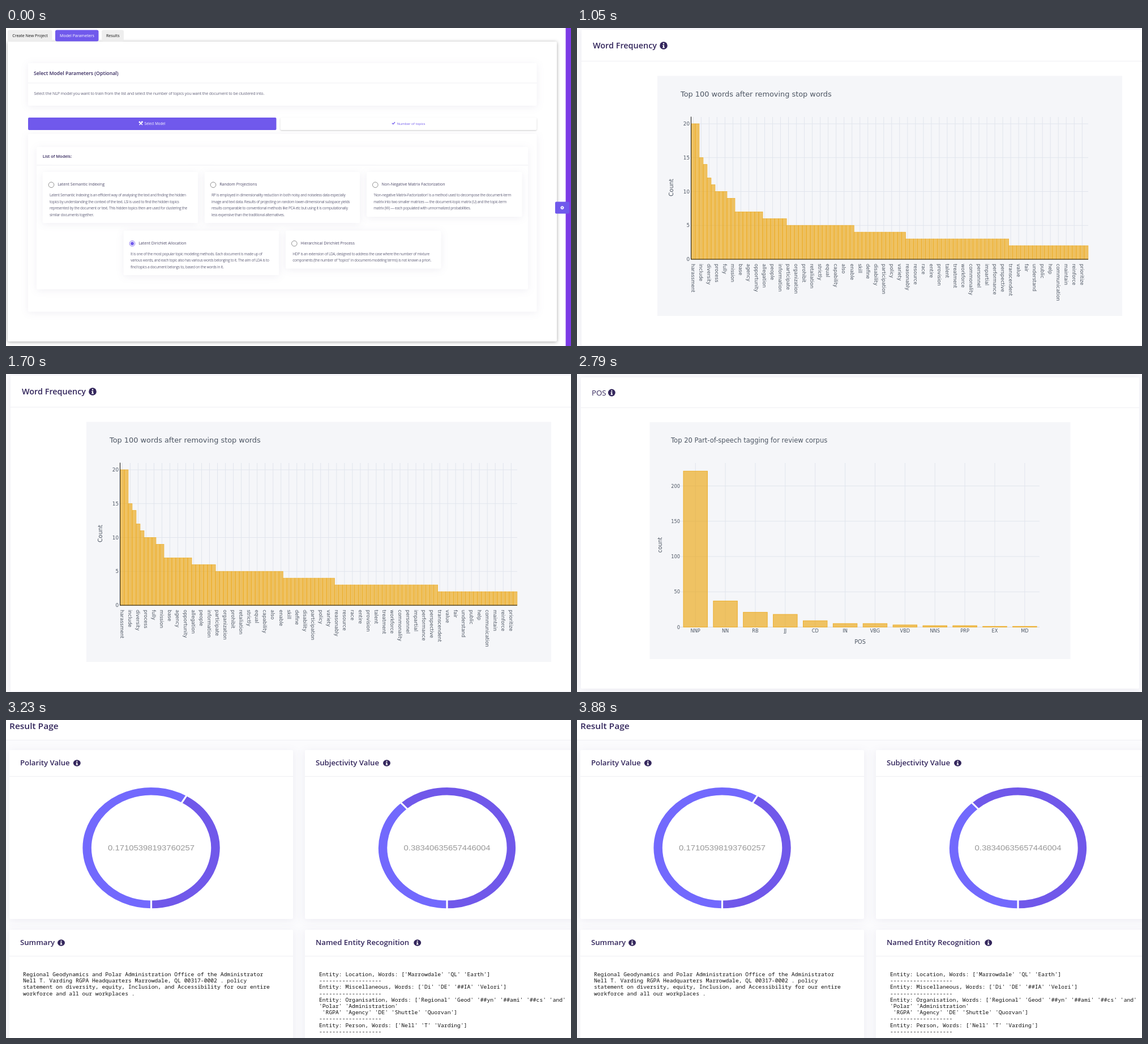
Animation of 998 by 561 pixels, one loop 4320 ms. Source, as an HTML page:

```html
<!DOCTYPE html>
<html lang="en">
<head>
<meta charset="utf-8">
<title>Topic modelling dashboard</title>
<style>
html, body { margin: 0; height: 100%; overflow: hidden; background: #fff; }
svg { display: block; width: 100vw; height: 100vh; }
text { white-space: pre; font-family: "Open Sans", sans-serif; fill: #33265c; }
.b { font-weight: 600; }
.plot { font-family: "DejaVu Sans", sans-serif; fill: #4d5663; }
.mono { font-family: "Noto Sans Mono", monospace; fill: #111; }
.num { font-family: "Liberation Sans", Arial, sans-serif; fill: #999; }
.soft { fill: #65647c; letter-spacing: -.023em; }
.tight { letter-spacing: -.048em; }
.card { fill: #fff; filter: drop-shadow(0 2px 7px rgba(60, 50, 120, .08)); }
.panel { fill: #fff; filter: drop-shadow(0 1px 3px rgba(0, 0, 0, .35)); }
.bar { fill: rgba(236, 161, 0, .6); stroke: #ecae2c; }
</style>
</head>
<body>
<svg id="stage" viewBox="0 0 998 561" preserveAspectRatio="none"></svg>
<script>
const PURPLE = '#7059ec', INK = '#33265c', GRID = '#e1e5ed', LINE = '#efeff3';

const rect = (x, y, r, b, fill, extra = '') =>
  `<rect x="${x}" y="${y}" width="${r - x}" height="${b - y}" fill="${fill}" ${extra}/>`;
const card = (x, y, r, b, cls = 'card') => rect(x, y, r, b, '#fff', `class="${cls}" rx="2"`);
const line = (x1, y1, x2, y2, color = LINE, w = 1) =>
  `<path d="M${x1} ${y1}L${x2} ${y2}" stroke="${color}" stroke-width="${w}"/>`;
const text = (x, y, size, str, cls = '', extra = '') =>
  `<text x="${x}" y="${y}" font-size="${size}" class="${cls}" ${extra}>${str}</text>`;
const lines = (x, y, step, size, rows, cls) =>
  rows.map((row, i) => text(x, y + i * step, size, row, cls)).join('');
const MID = 'text-anchor="middle"', END = 'text-anchor="end"';
const white = 'style="fill:#fff"', violet = `style="fill:${PURPLE}"`;

const info = (x, y, r) => `<g transform="translate(${x} ${y}) scale(${r / 6.5})">
  <circle r="6.5" fill="${INK}"/><circle cy="-3.1" r="1.2" fill="#fff"/>
  <path d="M-1.7-.9H1V2.7H1.8V4H-1.8V2.7H-1V.4H-1.7Z" fill="#fff"/></g>`;

// Model selection
function model(x, y, b, name, rows, on) {
  const w = x + 274.5, cy = y + 22.7;
  return card(x, y, w, b) +
    `<circle cx="${x + 15.3}" cy="${cy}" r="4.8" fill="#fff" stroke="${on ? PURPLE : '#777'}" stroke-width=".8"/>` +
    (on ? `<circle cx="${x + 15.3}" cy="${cy}" r="3" fill="${PURPLE}"/>` : '') +
    text(x + 26.5, y + 24.2, 7.05, name, '', 'style="fill:#4a4666"') +
    lines(x + 12.3, y + 43, 11.6, 6.6, rows, 'soft tight');
}

function parameters() {
  return rect(0, 0, 998, 561, '#fff') +
    card(3, 24, 973, 553, 'panel') +
    rect(3, 3.5, 81.5, 23.5, '#eee', 'rx="3"') + rect(169, 3.5, 208, 23.5, '#eee', 'rx="3"') +
    rect(87, 3.5, 163.5, 23.5, PURPLE, 'rx="3"') +
    text(42.5, 16, 7.05, 'Create New Project', '', MID + ' style="fill:#111"') +
    text(125.5, 16, 7.1, 'Model Parameters', '', MID + ' ' + white) +
    text(188.7, 16, 7.05, 'Results', '', MID + ' style="fill:#111"') +
    rect(988.6, 0, 998, 561, '#7c3be6') +
    rect(970, 306.5, 995, 327.5, PURPLE, 'rx="2"') +
    `<g transform="translate(982.5 317)" fill="none" stroke="#fff">
      <circle r="1.8" stroke-width="1.6"/><circle r="2.8" stroke-width="1" stroke-dasharray="1.1"/></g>` +
    card(39, 62, 937.5, 137) + line(39, 97, 937.5, 97) +
    text(49, 83, 8.75, 'Select Model Parameters (Optional)', 'b') +
    text(49.5, 117.7, 7.15, 'Select the NLP model you want to train from the list and select the number of topics you want the document to be clustered into.', 'soft') +
    rect(39, 158, 477.5, 180, PURPLE, 'rx="2"') +
    `<path d="M236 166L241 171M241 165.5L235.5 171" stroke="#fff" stroke-width="1.5"/>
     <circle cx="236" cy="166" r="1.5" fill="#fff"/><circle cx="240.3" cy="165.8" r="1.5" fill="#fff"/>` +
    text(244.5, 170.5, 6.2, 'Select Model', '', white) +
    rect(484.5, 158, 937.5, 180, '#fff', 'rx="2" style="filter:drop-shadow(0 1px 1px rgba(0,0,0,.2))"') +
    `<path d="M682 167.8L683.8 169.6L687 166" fill="none" stroke="${PURPLE}" stroke-width="1.3"/>` +
    text(690.7, 170.5, 6.15, 'Number of topics', '', violet) +
    card(39, 187, 937.5, 500.5) + card(54, 210, 922, 461) + line(54, 242, 922, 242) +
    text(64.7, 229, 7.4, 'List of Models:', 'b') +
    model(64.7, 254, 344, 'Latent Semantic Indexing', [
      'Latent Semantic Indexing is an efficient way of analysing the text and finding the hidden',
      'topics by understanding the context of the text. LSI is used to find the hidden topics',
      'represented by the document or text. This hidden topics then are used for clustering the',
      'similar documents together.']) +
    model(350.7, 254, 344, 'Random Projections', [
      'RP is employed in dimensionality reduction in both noisy and noiseless data especially',
      'image and text data. Results of projecting on random lower-dimensional subspace yields',
      'results comparable to conventional methods like PCA etc but using it is computationally',
      'less expensive than the traditional alternatives.']) +
    model(637, 254, 333, 'Non-Negative Matrix Factorization', [
      "'Non-negative Matrix-Factorization' is a method used to decompose the document-term",
      'matrix into two smaller matrices — the document-topic matrix (U) and the topic-term',
      'matrix (W) — each populated with unnormalized probabilities.']) +
    model(207.7, 357.5, 436, 'Latent Dirichlet Allocation', [
      'It is one of the most popular topic modeling methods. Each document is made up of',
      'various words, and each topic also has various words belonging to it. The aim of LDA is to',
      'find topics a document belongs to, based on the words in it.'], true) +
    model(494, 357.5, 424.5, 'Hierarchical Dirichlet Process', [
      'HDP is an extension of LDA, designed to address the case where the number of mixture',
      'components (the number of "topics" in document-modeling terms) is not known a priori.']);
}

// Word frequency chart
function frequency() {
  const words = `harassment include diversity process fully mission base agency opportunity allegation
    people information participate organization prohibit retaliation strictly equal capability also
    enable skill define disability participation policy variety reasonably resource race entire
    provision talent treatment workforce commonality personnel impartial performance perspective
    transcendent value fair understand public help communication maintain reinforce prioritize`.split(/\s+/);
  const runs = [[20, 2], [15, 1], [14, 1], [12, 1], [11, 1], [10, 3], [9, 2], [7, 7], [6, 6],
    [5, 17], [4, 13], [3, 26], [2, 20]];
  const x0 = 201.8, step = 7.01, base = 408, unit = 11.95;
  const counts = runs.flatMap(([n, times]) => Array(times).fill(n));
  let out = rect(0, 0, 998, 561, '#fafafc') + card(8, 3, 1010, 560) + line(8, 58.5, 998, 58.5) +
    text(28, 36, 14.4, 'Word Frequency', 'b') + info(153, 31, 6.8) +
    rect(142, 84.5, 963, 508, '#f5f6f9') +
    text(183, 120.5, 12.88, 'Top 100 words after removing stop words', 'plot');
  words.forEach((word, i) => {
    const x = x0 + (2 * i + .5) * step;
    out += line(x, 157, x, base, GRID) +
      `<text class="plot" font-size="8.5" transform="translate(${x - 3.2} 416) rotate(90)">${word}</text>`;
  });
  for (let n = 0; n <= 20; n += 5) {
    const y = base - n * unit;
    out += line(x0, y, 903, y, GRID) + text(199, y + 3, 8.8, n, 'plot', END);
  }
  counts.forEach((n, i) => {
    const x = x0 + i * step;
    out += rect(x, base - n * unit, x + step, base, '', 'class="bar" stroke-width=".8"');
  });
  return out + line(201.5, 156.5, 201.5, 408, '#111') + line(201, base, 903, base, '#111') +
    `<text class="plot" font-size="10.4" text-anchor="middle" transform="translate(170 281.5) rotate(-90)">Count</text>`;
}

// Part-of-speech chart
function speech() {
  const tags = 'NNP NN RB JJ CD IN VBG VBD NNS PRP EX MD'.split(' ');
  const counts = [221, 37, 21, 18, 9, 5, 5, 3, 2, 2, 1, 1];
  const base = 446.5, unit = 1.245;
  let out = rect(0, 0, 998, 561, '#fafafc') + card(7, 6, 993, 555) + line(7, 59.5, 993, 59.5) +
    text(26, 38, 13.2, 'POS') + info(61.3, 33, 6.4) +
    rect(128.5, 85, 871.5, 503, '#f5f6f9') +
    text(166, 121, 11.56, 'Top 20 Part-of-speech tagging for review corpus', 'plot');
  for (let n = 0; n <= 200; n += 50) {
    const y = base - n * unit;
    out += line(183, y, 817, y, n ? GRID : '#d3d9e6') + text(182, y + 3, 8.2, n, 'plot', END);
  }
  tags.forEach((tag, i) => {
    const x = 209.2 + i * 52.88;
    out += line(x, 157, x, base, GRID) +
      rect(x - 21.2, base - counts[i] * unit, x + 21.2, base, '', 'class="bar"') +
      text(x, 455.7, 8.2, tag, 'plot', MID);
  });
  return out + text(500, 475.7, 9.7, 'POS', 'plot', MID) +
    `<text class="plot" font-size="9.7" text-anchor="middle" transform="translate(149.5 301.5) rotate(-90)">count</text>`;
}

// Result page, drawn in a space that is wider than tall
const WIDE = 1.136;

function donut(cx, share, value) {
  const r = 99.8, start = Math.PI / 2 - share * 2 * Math.PI;
  const x = r * Math.cos(start), y = r * Math.sin(start);
  const arc = (sweep, large, color) =>
    `<path d="M${x} ${y}A${r} ${r} 0 ${+large} ${sweep} 0 ${r}" fill="none" stroke="${color}" stroke-width="13.6"/>`;
  const gap = (gx, gy) => line(gx * .9, gy * .9, gx * 1.1, gy * 1.1, '#fff', 2.8);
  return `<g transform="translate(${cx} 225.6)">` +
    arc(1, share > .5, '#7058ea') + arc(0, share < .5, '#7269fd') + gap(x, y) + gap(0, r) +
    text(0, 4, 13.1, value, 'num', MID) + '</g>';
}

function results() {
  const X = x => x / WIDE;
  const box = (x, y, r, b, iconX, title) =>
    card(X(x), y, X(r), b) + line(X(x), y + 46.5, X(r), y + 46.5) +
    text(X(x + 19), y + 27.3, 11.6, title, 'b') + info(X(iconX), y + 23, 5.7);
  const rule = '-'.repeat(19);
  return rect(0, 0, 998, 561, '#fbfbfd') + rect(0, 0, 998, 35, '#fff') + line(0, 35.5, 998, 35.5) +
    `<g transform="scale(${WIDE} 1)">` +
    text(X(6), 16, 13.65, 'Result Page', 'b') +
    box(6, 53, 507, 351, 125.3, 'Polarity Value') +
    box(528, 53, 1010, 351, 672.5, 'Subjectivity Value') +
    box(6, 370, 507, 600, 97.5, 'Summary') +
    box(528, 370, 1010, 600, 726.7, 'Named Entity Recognition') +
    donut(X(256.5), (1 - .17105) / 2, '0.17105398193760257') +
    donut(X(779), 1 - .38341, '0.38340635657446004') +
    lines(X(30), 452, 11.2, 8.55, [
      'Regional Geodynamics and Polar Administration Office of the Administrator',
      'Nell T. Varding RGPA Headquarters Marrowdale, QL 00317-0002 . policy',
      'statement on diversity, equity, Inclusion, and Accessibility for our entire',
      'workforce and all our workplaces .'], 'mono') +
    lines(X(553), 452, 11.2, 8.55, [
      "Entity: Location, Words: ['Marrowdale' 'QL' 'Earth']", rule,
      "Entity: Miscellaneous, Words: ['Di' 'DE' '##IA' 'Velori']", rule,
      "Entity: Organisation, Words: ['Regional' 'Geod' '##yn' '##ami' '##cs' 'and'",
      "'Polar' 'Administration'",
      " 'RGPA' 'Agency' 'DE' 'Shuttle' 'Quorvan']", rule,
      "Entity: Person, Words: ['Nell' 'T' 'Varding']", rule], 'mono') + '</g>';
}

const stage = document.getElementById('stage');
stage.innerHTML = [parameters, frequency, speech, results].map(draw => `<g>${draw()}</g>`).join('');
const pages = [...stage.children];
const begin = performance.now();

function show() {
  const t = (performance.now() - begin) % 4320;
  const current = t < 1050 ? 0 : 1 + Math.floor((t - 1050) / 1090);
  pages.forEach((page, i) => { page.style.display = i === current ? '' : 'none'; });
  requestAnimationFrame(show);
}
show();
</script>
</body>
</html>
```
